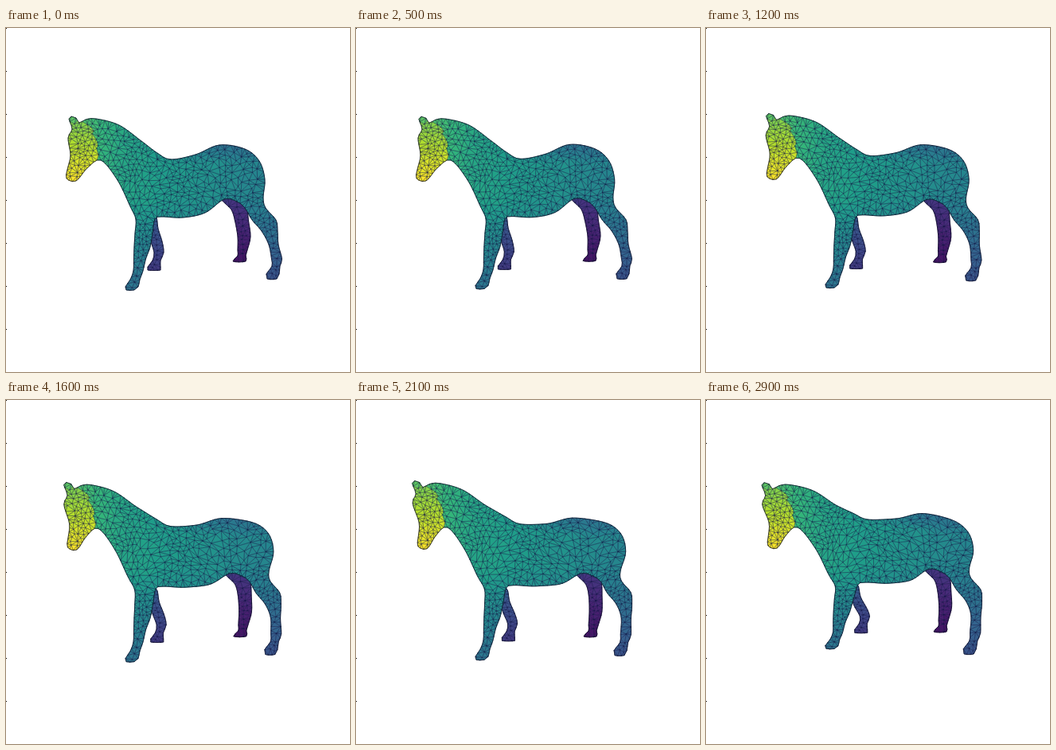
Recreate the animation shown at these times as an HTML page with a canvas. Size 432 by 432 pixels, loop 3.5 s.

```html
<!DOCTYPE html>
<html lang="en">
<head>
<meta charset="utf-8">
<title>Horse mesh</title>
<style>
html, body { margin: 0; overflow: hidden; background: #fff; }
canvas { display: block; }
</style>
</head>
<body>
<canvas width="432" height="432"></canvas>
<script>
const ctx = document.querySelector('canvas').getContext('2d');
const LOOP = 3500, STEP = 100, LAST = 2900;

let seed = 7;
const random = () => (seed = seed * 16807 % 2147483647) / 2147483647;
const clamp = (v, lo = 0, hi = 1) => Math.max(lo, Math.min(hi, v));
const mix = (a, b, f) => a + (b - a) * f;
const smoothstep = f => f * f * (3 - 2 * f);

// Two motions drive the whole body: a lasting drift and a passing sway.
const drift = t => smoothstep(clamp((t - 500) / 1600));
const sway = t => .35 * Math.exp(-(((t - 900) / 350) ** 2)) + clamp((t - 1600) / 1300) ** 2;

// Limb outline from [x, y, half width]: down the right side, up the left.
const limb = spine => [...spine.map(([x, y, w]) => [x + w, y]),
  ...spine.map(([x, y, w]) => [x - w, y]).reverse()];

const hindLeg = limb([[313, 226, 13], [324, 241, 15], [331, 255, 10], [336, 272, 6],
  [340, 290, 6.5], [339, 299, 5], [335, 309, 8], [334, 315, 6]]);
const foreLeg = limb([[175, 240, 12], [173, 258, 11], [171, 275, 10], [168, 290, 7.5],
  [166, 305, 6], [162, 316, 6], [158, 325, 8], [156, 329, 5]]);
const farHind = limb([[286, 215, 14], [293, 228, 10], [296, 242, 8.5], [299, 262, 8],
  [297, 279, 6], [296, 286, 5], [293, 293, 8]]);
const farFore = limb([[182, 236, 6], [185, 252, 6], [189, 268, 7], [192, 282, 6],
  [189, 292, 5], [186, 300, 8], [186, 304, 8]]);
const back = [[82, 111], [88, 113], [92, 119], [100, 115], [113, 114], [142, 122], [170, 142],
  [190, 157], [207, 165], [238, 159], [268, 147], [300, 152], [318, 167], [325, 190], [323, 213]];
const belly = [[290, 218], [274, 215], [250, 232], [222, 238], [195, 237]];
const chestAndFace = [[156, 224], [140, 191], [119, 166], [102, 176], [88, 192], [76, 189],
  [77, 178], [81, 160], [78, 138], [83, 127], [79, 114]];

// Handles: x, y, drift x, drift y, sway x, sway y.
const bodyHandles = [
  [82, 111, -9, -10, -1, 3], [113, 114, -7, -10, 0, 2], [82, 190, 3, -5, 0, -1],
  [119, 166, -5, -6, 0, 0], [155, 130, -7, -8, 2, 1], [207, 165, 0, -12, -6, -6],
  [238, 159, 0, -1, 2, -9], [268, 147, 4, 4, -1, -6], [318, 172, 16, 0, -4, -1],
  [276, 215, 8, 5, -3, -7], [222, 237, 3, -4, 4, -4], [147, 205, -4, -2, 2, -2],
  [339, 243, 6, 1, 0, -4], [335, 315, -3, 6, -1, -2], [168, 285, 0, -2, -1, -7],
  [157, 330, 0, 0, 0, -18]];
const farHindHandles = [[285, 215, 6, 4, -2, -6], [295, 290, 1, 5, 0, -7]];
const farForeHandles = [[187, 240, 1, 2, 1, -6], [190, 300, 5, 0, 4, -12]];

// Places on the colour scale, 0 dark violet to 1 yellow.
function bodyTone(x, y) {
  if (Math.hypot((x - 92) / 24, (y - 162) / 46) < 1) return .78 + (y - 110) * .0027;
  const shade = clamp((x - 180) / 40) * Math.max(0, 170 - y) * .005;
  return .62 - .0008 * (x - 115) + .0015 * Math.max(0, 150 - x) - .0018 * Math.max(0, y - 215) - shade;
}
const farHindTone = (x, y) => .16 - (y - 215) * .0015;
const farForeTone = (x, y) => .3 - (y - 235) * .0018;

const viridis = ['440154', '482878', '3e4989', '31688e', '26828e', '1f9e89', '35b779', '6ece58',
  'b5de2b', 'fde725'].map(hex => hex.match(/../g).map(c => parseInt(c, 16)));

function colour(v) {
  const s = clamp(v, 0, .999) * 9, i = Math.floor(s);
  return `rgb(${viridis[i].map((c, k) => Math.round(mix(c, viridis[i + 1][k], s - i)))})`;
}

// Share of each handle in the motion of a point.
function pulls([x, y], handles) {
  const w = handles.map(h => Math.exp(-((h[0] - x) ** 2 + (h[1] - y) ** 2) / 1200) + 1e-12);
  const sum = w.reduce((a, b) => a + b);
  return w.map(v => v / sum);
}

// Closed Catmull-Rom curve, sampled about every 4.5 px.
function smooth(knots) {
  const n = knots.length;
  return knots.flatMap((b, i) => {
    const [a, c, d] = [-1, 1, 2].map(k => knots[(i + k + n) % n]);
    const count = Math.max(1, Math.round(Math.hypot(c[0] - b[0], c[1] - b[1]) / 4.5));
    return Array.from({ length: count }, (_, k) => {
      const t = k / count;
      return [0, 1].map(j => b[j] + t / 2 * (c[j] - a[j] +
        t * (2 * a[j] - 5 * b[j] + 4 * c[j] - d[j] + t * (3 * (b[j] - c[j]) + d[j] - a[j]))));
    });
  });
}

function polygon(points) {
  const path = new Path2D();
  points.forEach(p => path.lineTo(...p));
  path.closePath();
  return path;
}

function circle(pts, a, b, c) {
  const [ax, ay] = pts[a], bx = pts[b][0] - ax, by = pts[b][1] - ay;
  const cx = pts[c][0] - ax, cy = pts[c][1] - ay;
  const d = 2 * (bx * cy - by * cx) || 1e-9, b2 = bx * bx + by * by, c2 = cx * cx + cy * cy;
  const ux = (cy * b2 - by * c2) / d, uy = (bx * c2 - cx * b2) / d;
  return { v: [a, b, c], x: ax + ux, y: ay + uy, r2: ux * ux + uy * uy };
}

// Bowyer-Watson triangulation.
function delaunay(points) {
  const n = points.length, pts = [...points, [-3000, -3000], [4000, -3000], [200, 5000]];
  let tris = [circle(pts, n, n + 1, n + 2)];
  for (let i = 0; i < n; i++) {
    const [x, y] = pts[i], edges = new Map();
    tris = tris.filter(t => {
      if ((x - t.x) ** 2 + (y - t.y) ** 2 >= t.r2) return true;
      t.v.forEach((a, k) => {
        const b = t.v[(k + 1) % 3], key = Math.min(a, b) * 10000 + Math.max(a, b);
        edges.has(key) ? edges.delete(key) : edges.set(key, [a, b]);
      });
      return false;
    });
    for (const [a, b] of edges.values()) tris.push(circle(pts, a, b, i));
  }
  return tris.map(t => t.v).filter(v => v.every(k => k < n));
}

function makeMesh(outline, handles, toneAt) {
  const rim = smooth(outline), shape = polygon(rim), points = [...rim];
  const inside = (x, y) => ctx.isPointInPath(shape, x, y);
  for (let i = 0; i < 9000; i++) {
    const x = mix(70, 350, random()), y = mix(108, 332, random());
    if (!inside(x, y)) continue;
    const trunk = x > 185 && y < 238, sx = trunk ? .75 : 1, sy = trunk ? 1.25 : 1;
    const gap = (x < 120 || y > 238 ? 4.6 : 6) * mix(.75, 1.2, random());
    if (points.every(p => Math.hypot((p[0] - x) * sx, (p[1] - y) * sy) > gap)) points.push([x, y]);
  }
  const centre = v => [0, 1].map(j => v.reduce((s, k) => s + points[k][j], 0) / 3);
  const faces = delaunay(points).filter(v => inside(...centre(v)))
    .map(v => ({ v, fill: colour(toneAt(...centre(v)) + (random() - .5) * .02) }));
  return { points, faces, handles, rim: rim.length, pull: points.map(p => pulls(p, handles)) };
}

function drawMesh({ points, faces, handles, rim, pull }, d, s) {
  const shifts = handles.map(h => [h[2] * d + h[4] * s, h[3] * d + h[5] * s]);
  const moved = points.map((p, i) => p.map((c, j) => c + shifts.reduce((sum, m, k) => sum + m[j] * pull[i][k], 0)));
  const wires = new Path2D();
  ctx.lineWidth = .6;
  for (const { v, fill } of faces) {
    const face = polygon(v.map(k => moved[k]));
    ctx.fillStyle = ctx.strokeStyle = fill;
    ctx.fill(face);
    ctx.stroke(face);
    wires.addPath(face);
  }
  ctx.lineWidth = .5;
  ctx.strokeStyle = 'rgba(20,25,70,.55)';
  ctx.stroke(wires);
  ctx.lineWidth = .9;
  ctx.strokeStyle = 'rgba(10,10,30,.75)';
  ctx.stroke(polygon(moved.slice(0, rim)));
}

ctx.lineJoin = 'round';
const meshes = [
  makeMesh(farHind, farHindHandles, farHindTone),
  makeMesh(farFore, farForeHandles, farForeTone),
  makeMesh([...back, ...hindLeg, ...belly, ...foreLeg, ...chestAndFace], bodyHandles, bodyTone)];

function draw(time) {
  ctx.fillStyle = '#fff';
  ctx.fillRect(0, 0, 432, 432);
  ctx.fillStyle = '#000';
  for (let y = 0; y < 432; y += 54) ctx.fillRect(0, y, 1, 1);
  meshes.forEach(m => drawMesh(m, drift(time), sway(time)));
}

let shown = -1;
function tick() {
  const time = Math.min(LAST, Math.floor(performance.now() % LOOP / STEP) * STEP);
  if (time !== shown) draw(shown = time);
  requestAnimationFrame(tick);
}
tick();
</script>
</body>
</html>
```
